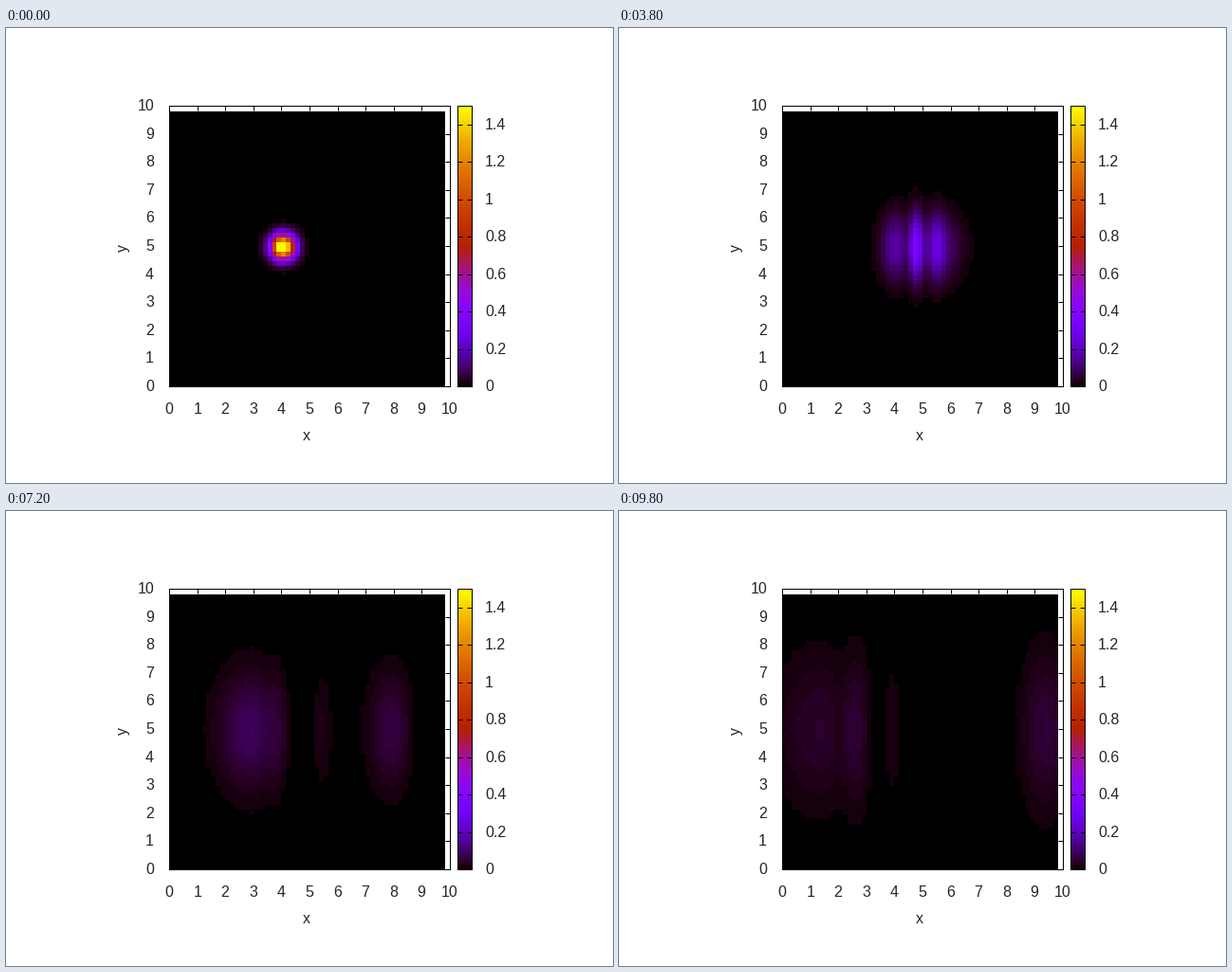
A matplotlib script that plays this animation: 640 px wide and 480 px high, repeating every 9.9 s.

```python
import numpy as np
import matplotlib.pyplot as plt
from matplotlib.animation import FuncAnimation
from matplotlib.colors import ListedColormap
from matplotlib.patches import Rectangle

W, H, DPI = 640, 480, 100
FRAMES, STEP = 99, 100
PX = 72 / DPI                      # one pixel in points
LEFT, RIGHT, TOP, BOTTOM = 172.5, 468.5, 82.5, 378.5
BAR_L, BAR_R = 476.5, 491.5
UNIT = (RIGHT - LEFT) / 10
VMAX, LEVELS = 1.5, 128
GRID = np.arange(60) / 6
HIT = 22                           # step at which the packet meets the wall


def ramp(t, start, end):
    p = np.clip((t - start) / (end - start), 0, 1)
    return p * p * (3 - 2 * p)


def bump(x, centre, peak, left, right=None):
    width = np.where(x < centre, left, right or left)
    return peak * np.exp(-((x - centre) / width) ** 2 / 2)


def crest(x, t):
    """The incoming packet, then the inner crest thrown back."""
    s = max(t - HIT, 0)
    if t < HIT:
        centre = 4.92 - 0.0155 * (HIT - t) ** 1.3
        peak = 1.15 + 0.75 * (t / 12 - 1) ** 2
        width = 0.28 + 0.0174 * t - 0.00114 * t ** 2
    else:
        centre = 4.92 - 0.00095 * s ** 1.8
        peak = 0.055 + 1.65 * np.exp(-(s / 13) ** 2)
        width = 0.11 + 0.003 * s
    return bump(x, centre, peak, width)


def reflected(x, t):
    s = max(t - HIT, 0)
    peak = 0.2 * ramp(t, 8, HIT) / (1 + (s / 48) ** 2.5)
    return bump(x, 4.28 - 0.00117 * s ** 1.8, peak,
                0.2 + 0.0125 * s, 0.2 + 0.25 * ramp(t, 35, 55))


def trapped(x, t):
    s = max(t - HIT, 0)
    peak = 0.35 * ramp(t, 6, HIT) / (1 + (s / 21) ** 2.85)
    return bump(x, 5.2 + 0.28 * ramp(t, HIT, 38), peak, 0.22)


def leaking(x, t):
    return bump(x, 4.5 - 0.037 * (t - 83), 0.021 * ramp(t, 68, 83), 0.25)


def passed(x, t):
    peak = (0.1 - 0.0004 * t) * ramp(t, 20, 38)
    return bump(x, 6.8 + 0.059 * (t - 53), peak, 0.3 + 0.0035 * t, 0.43)


def density(t):
    parts = (crest, reflected, trapped, leaking, passed)
    along_x = sum(part(GRID, t) for part in parts)
    along_y = bump(GRID, 5, 1, np.hypot(0.28, 0.0195 * t))
    # each cell takes the mean of its four corners
    mid_x = (along_x[1:] + along_x[:-1]) / 2
    mid_y = (along_y[1:] + along_y[:-1]) / 2
    return np.outer(mid_y, mid_x)


def palette():
    g = np.linspace(0, 1, LEVELS)
    blue = np.clip(np.sin(2 * np.pi * g), 0, 1)
    return ListedColormap(np.column_stack([np.sqrt(g), g ** 3, blue]))


fig = plt.figure(figsize=(W / DPI, H / DPI), dpi=DPI, facecolor="white")
ax = fig.add_axes([0, 0, 1, 1])
cmap = palette()


def line(x0, y0, x1, y1):
    ax.plot([x0, x1], [y0, y1], color="black", lw=PX, zorder=3,
            solid_capstyle="butt", snap=False)


def label(x, y, text, ha="center", **kw):
    kw.setdefault("va", "baseline")
    ax.text(x, y, text, ha=ha, family="Liberation Sans",
            fontsize=16 * PX, color="0.15", **kw)


def frame(x0, x1):
    ax.add_patch(Rectangle((x0, TOP), x1 - x0, BOTTOM - TOP, fill=False,
                           ec="black", lw=PX, zorder=3, snap=False))


def cells(x_edges, y_edges, data, vmax):
    return ax.pcolormesh(np.rint(x_edges), np.rint(y_edges), data, cmap=cmap,
                         vmin=0, vmax=vmax, antialiased=False, zorder=1)


steps = GRID * UNIT
field = cells(LEFT - 0.5 + steps, BOTTOM + 0.5 - steps, density(0), VMAX)
cells(np.array([BAR_L, BAR_R]) + [-0.5, 0.5],
      np.linspace(BOTTOM + 0.5, TOP - 0.5, LEVELS + 1),
      np.arange(LEVELS)[:, None], LEVELS)

frame(LEFT, RIGHT)
frame(BAR_L, BAR_R)
for i in range(11):
    x, y = np.floor([LEFT + i * UNIT, BOTTOM - i * UNIT]) + 0.5
    line(x, TOP, x, TOP + 5)
    line(x, BOTTOM, x, BOTTOM - 5)
    line(LEFT, y, LEFT + 5, y)
    line(RIGHT, y, RIGHT - 5, y)
    label(x - 0.5, 407, str(i))
    label(156, y + 4.5, str(i), ha="right")

for i in range(8):
    value = i / 5
    y = np.floor(BOTTOM - value / VMAX * (BOTTOM - TOP)) + 0.5
    line(BAR_L, y, BAR_L + 5, y)
    line(BAR_R, y, BAR_R - 5, y)
    label(505, y + 4.5, f"{value:g}", ha="left")

label(317, 435, "x")
label(123, 231.5, "y", rotation=90, va="center")

ax.set_xlim(0, W)
ax.set_ylim(H, 0)
ax.axis("off")


def update(i):
    field.set_array(density(i))
    return [field]


anim = FuncAnimation(fig, update, frames=FRAMES, interval=STEP,
                     repeat=True, repeat_delay=0, blit=False)
plt.show()
```
